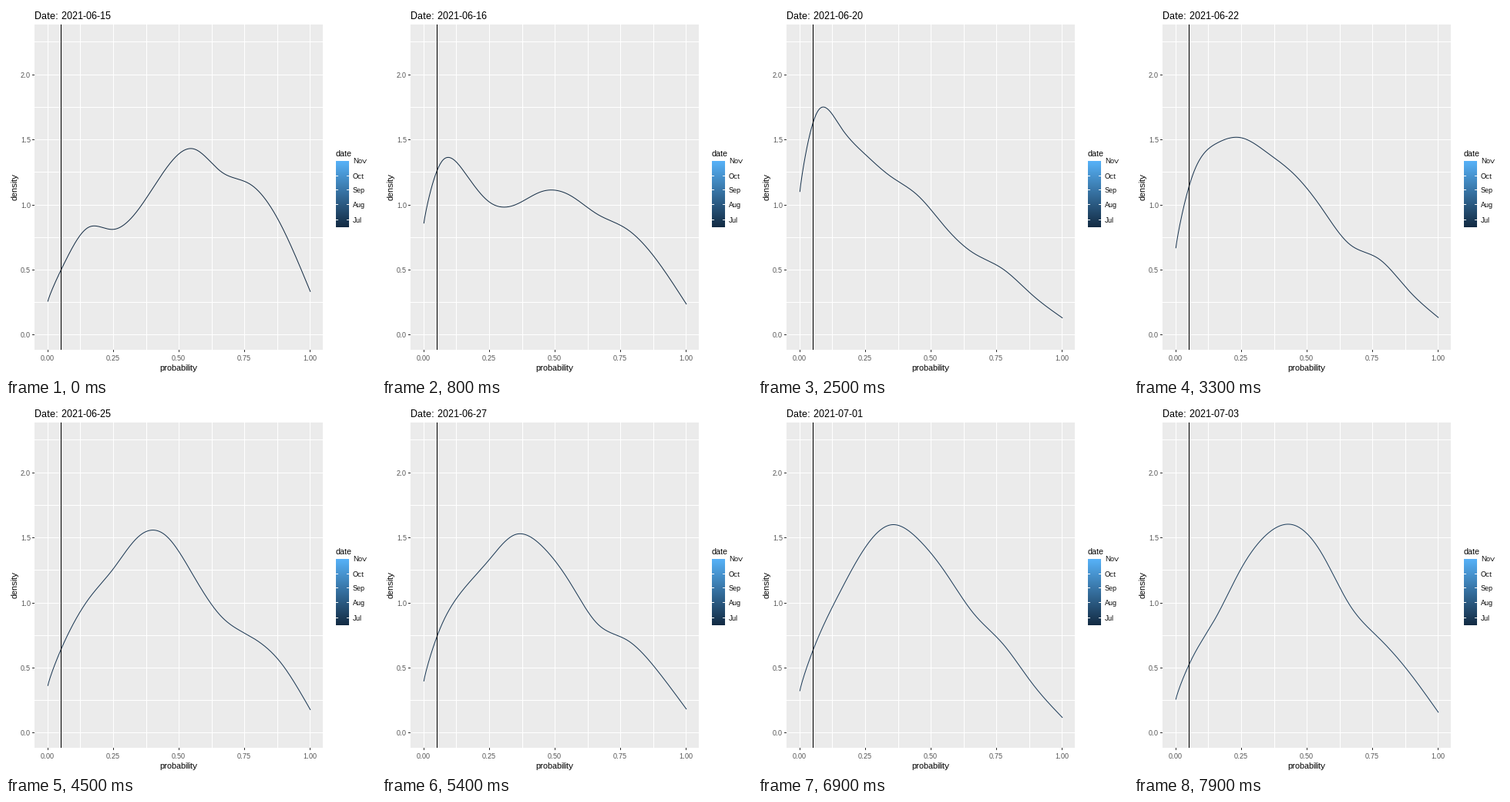
A matplotlib script that plays this animation: 480 by 480 pixels, repeating every 8000 ms.

```python
import matplotlib.pyplot as plt
import numpy as np
from matplotlib.animation import FuncAnimation
from matplotlib.patches import Rectangle

SIZE, DPI, FRAMES, STEP = 480, 72, 80, 100
DAYS_PER_FRAME, SPAN = 0.2335, 139.5
LEFT, TOP, RIGHT, BOTTOM = 37, 24, 411, 446
WARP = 1.15  # packs the key points towards probability 0
LOW, HIGH = np.array([0x13, 0x2B, 0x43]) / 255, np.array([0x56, 0xB1, 0xF7]) / 255

plt.rcParams.update({"text.hinting": "native", "text.hinting_factor": 1})

# Key points of the density curve in each pose, by frame number.
POSES = {
    0: [.26, .585, .83, .812, .975, 1.28, 1.43, 1.25, 1.155, .855, .335],
    17: [1.535, 2.19, 1.71, 1.255, 1.03, .905, .675, .56, .43, .27, .13],
    33: [.67, 1.265, 1.475, 1.515, 1.4, 1.235, .975, .695, .585, .345, .135],
    45: [.365, .735, 1.035, 1.265, 1.515, 1.515, 1.205, .89, .74, .545, .18],
    54: [.4, .845, 1.12, 1.335, 1.525, 1.435, 1.16, .835, .715, .49, .185],
    69: [.325, .74, 1.1, 1.43, 1.6, 1.49, 1.23, .915, .685, .38, .12],
    79: [.26, .61, .905, 1.27, 1.53, 1.597, 1.38, .98, .73, .475, .16],
}


def px(p):
    return 54.35 + 340.4 * p


def py(d):
    return 426.9 - 168.9 * d


def spline(y, x):
    """Natural cubic spline through evenly spaced values on [0, 1]."""
    n = len(y)
    a = np.eye(n)
    b = np.zeros(n)
    for i in range(1, n - 1):
        a[i, i - 1:i + 2] = 1, 4, 1
        b[i] = 6 * (y[i - 1] - 2 * y[i] + y[i + 1])
    m = np.linalg.solve(a, b)
    s = x * (n - 1)
    i = np.minimum(s.astype(int), n - 2)
    t = s - i
    u = 1 - t
    return u * y[i] + t * y[i + 1] + ((u**3 - u) * m[i] + (t**3 - t) * m[i + 1]) / 6


grid = np.linspace(0, 1, 341)
times = list(POSES)
curves = [spline(np.array(y), grid ** (1 / WARP)) for y in POSES.values()]

fig = plt.figure(figsize=(SIZE / DPI, SIZE / DPI), dpi=DPI, facecolor="white")
ax = fig.add_axes([0, 0, 1, 1])
ax.set(xlim=(0, SIZE), ylim=(SIZE, 0))
ax.axis("off")


def box(x, y, w, h, color, z=1):
    ax.add_patch(Rectangle((int(x), int(y)), w, h, fc=color, lw=0, aa=False, zorder=z))


def label(x, y, s, size, color="black", **kw):
    return ax.text(x, y, s, fontsize=size, color=color, family="Liberation Sans",
                   va="baseline", **kw)


# Panel, grid lines every half step, ticks and labels on the full steps
box(LEFT, TOP, RIGHT - LEFT, BOTTOM - TOP, "#EBEBEB", 0)
for k in range(10):
    x, y = px(k / 8), py(k / 4)
    if k < 9:
        box(x, TOP, 1, BOTTOM - TOP, "white")
    box(LEFT, y, RIGHT - LEFT, 1, "white")
    if k % 2 == 0:
        box(x, BOTTOM, 1, 3, "#333333")
        box(LEFT - 3, y, 3, 1, "#333333")
        label(int(x), 460, f"{k / 8:.2f}", 9, "#4D4D4D", ha="center")
        label(32, int(y) + 4, f"{k / 4:.1f}", 9, "#4D4D4D", ha="right")
box(px(.05), TOP, 1, BOTTOM - TOP, "black", 4)

label(224, 473, "probability", 11, ha="center")
label(15, 235, "density", 11, ha="center", rotation=90, rotation_mode="anchor")
title = label(37, 17, "", 13)

# Colour bar
label(428, 195, "date", 11)
for y in range(201, 287):
    box(428, y, 17, 1, LOW + (HIGH - LOW) * (286 - y) / 85)
for name, day in zip(["Jul", "Aug", "Sep", "Oct", "Nov"], [16, 47, 78, 108, 139]):
    y = int(287.1 - .62 * day)
    for x in (428, 442):
        box(x, y, 3, 1, "white", 2)
    label(450, y + 4, name, 9)

line, = ax.plot([], [], lw=1, zorder=3)


def date_text(days):
    d = 15 + int(days)
    month, day = (6, d) if d <= 30 else (7, d - 30)
    return f"Date: 2021-{month:02d}-{day:02d}"


def update(f):
    i = min(np.searchsorted(times, f, side="right"), len(times) - 1)
    t = (f - times[i - 1]) / (times[i] - times[i - 1])
    days = f * DAYS_PER_FRAME
    line.set_data(px(grid), py(curves[i - 1] * (1 - t) + curves[i] * t))
    line.set_color(LOW + (HIGH - LOW) * days / SPAN)
    title.set_text(date_text(days))
    return line, title


anim = FuncAnimation(fig, update, frames=FRAMES, interval=STEP,
                     repeat=True, repeat_delay=0)
plt.show()
```
